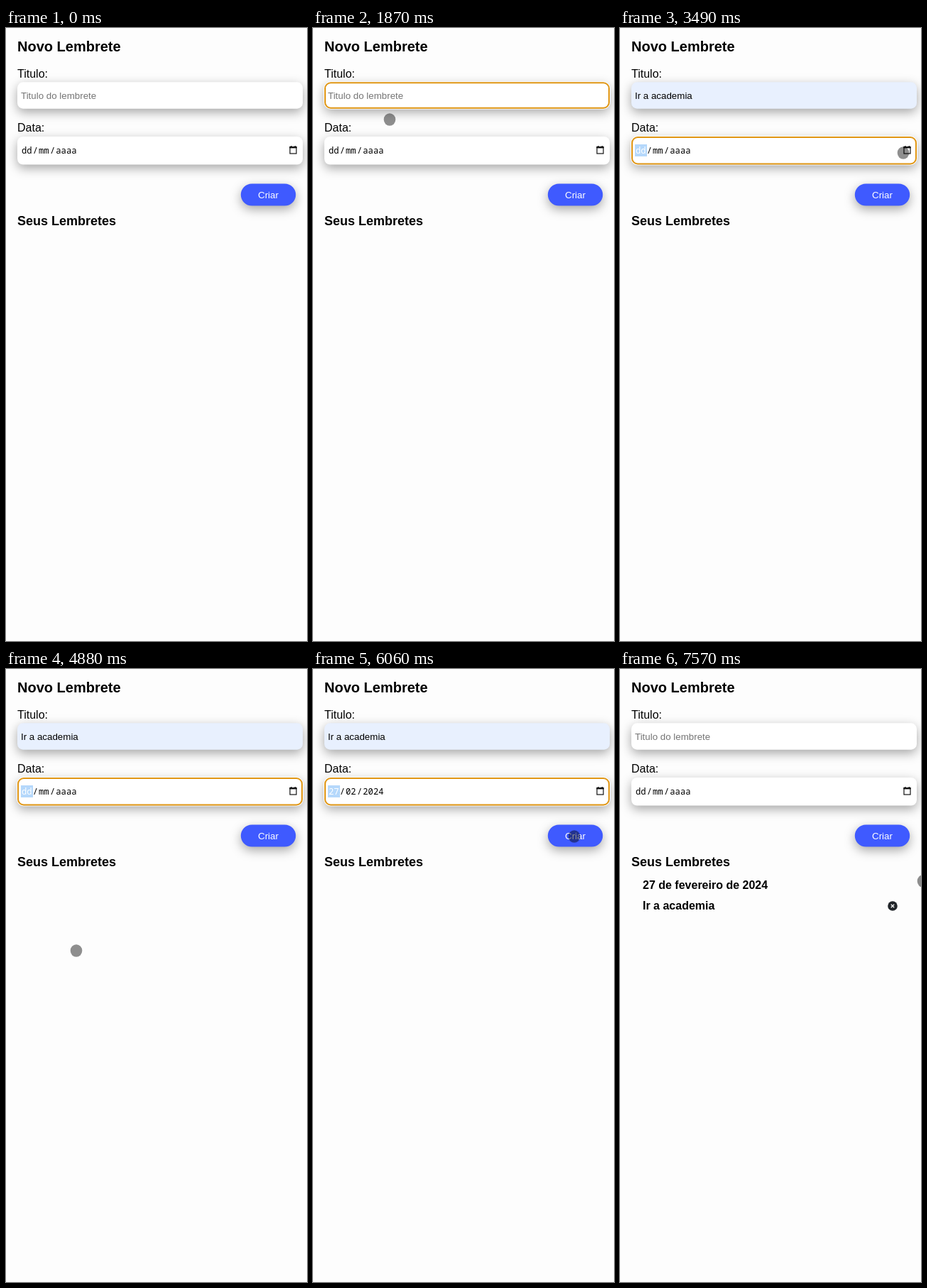
These frames come from a looping animation (424 by 864 pixels, 8 s). An HTML page with a canvas:

```html
<!DOCTYPE html>
<html lang="pt">
<head>
<meta charset="utf-8">
<title>Lembretes</title>
<style>
  html, body { margin: 0; width: 100%; height: 100%; overflow: hidden; background: #fdfdfd; }
  canvas { display: block; width: 424px; height: 864px; }
</style>
</head>
<body>
<canvas id="stage" width="424" height="864"></canvas>
<script>
const ctx = document.getElementById('stage').getContext('2d');
const LOOP = 8000;
const STEP = 100; // the pointer is redrawn ten times a second
const SANS = '"Liberation Sans", Arial, sans-serif';
const MONO = '"Noto Sans Mono", "DejaVu Sans Mono", monospace';

// Moments when the state of the form changes
const AT = { focusTitle: 1380, fill: 2270, focusDate: 3490, pickDate: 4980, create: 6160 };

// Pointer script: jump to a place, glide from there, hide over native popups
const jump = (at, x, y) => ({ at, until: at, x, y });
const glide = (at, until, x, y) => ({ at, until, x, y });
const hide = at => ({ at, hidden: true });
const moves = [
  hide(0),
  jump(590, 4, 146), glide(590, 1090, 107, 104), glide(1670, 2070, 109, 154), hide(2070),
  jump(2770, 128, 142), glide(2770, 3270, 399, 176), glide(3670, 4080, 292, 230), hide(4080),
  jump(4880, 99, 397), glide(4880, 5570, 315, 279), glide(5760, 6060, 368, 236),
  glide(6160, 6560, 338, 313), glide(6660, 6960, 336, 395), glide(7270, 7570, 427, 299)
];

function pointerAt(t) {
  const i = moves.findLastIndex(m => m.at <= t);
  const to = moves[i], from = moves[i - 1];
  if (to.hidden) return null;
  if (to.until === to.at) return to;
  const span = to.until - to.at;
  const u = Math.min(1, Math.floor((t - to.at) / STEP) * STEP / (span - span % STEP));
  const ease = u * u * (3 - 2 * u);
  return { x: from.x + (to.x - from.x) * ease, y: from.y + (to.y - from.y) * ease };
}

function text(str, x, y, font, color = '#000') {
  ctx.font = font;
  ctx.fillStyle = color;
  ctx.fillText(str, x, y);
}

function rounded(x, y, w, h, r) {
  ctx.beginPath();
  ctx.roundRect(x, y, w, h, r);
}

function panel(x, y, w, h, r, fill) {
  ctx.save();
  ctx.shadowColor = 'rgba(0,0,0,.35)';
  ctx.shadowBlur = 15;
  ctx.shadowOffsetY = 5;
  ctx.fillStyle = fill;
  rounded(x, y, w, h, r);
  ctx.fill();
  ctx.restore();
}

function outline(x, y, w, h, inset, width, color) {
  ctx.lineWidth = width;
  ctx.strokeStyle = color;
  rounded(x + inset, y + inset, w - 2 * inset, h - 2 * inset, 9 - inset);
  ctx.stroke();
}

function field(y, h, fill, focused) {
  const box = [16, y, 402, h];
  panel(...box, 8, fill);
  if (!focused) return;
  outline(...box, -0.5, 1, '#fff');
  outline(...box, 1, 2, '#e09614');
}

function calendarIcon() {
  ctx.strokeStyle = ctx.fillStyle = '#111';
  ctx.lineWidth = 1.2;
  ctx.strokeRect(400, 167.6, 9, 9.4);
  ctx.fillRect(399.5, 167, 10, 2.4);
  for (const x of [401, 406.6]) ctx.fillRect(x, 166, 1.4, 2);
}

function dateField(focused, picked) {
  const [day, month, year] = picked ? ['27', '02', '2024'] : ['dd', 'mm', 'aaaa'];
  const font = '12.2px ' + MONO;
  field(153, 39.5, '#fff', focused);
  if (focused) {
    ctx.fillStyle = '#b5d8fb';
    ctx.fillRect(21, 164, 17, 17);
  }
  text(day, 22, 177, font, focused ? '#fff' : '#000');
  text('/', 37.8, 177, font);
  text(month, 46, 177, font);
  text('/', 62, 177, font);
  text(year, 70.3, 177, font);
  calendarIcon();
}

function reminder() {
  text('27 de fevereiro de 2024', 32, 310, 'bold 16px ' + SANS);
  text('Ir a academia', 32, 339, 'bold 16px ' + SANS);
  ctx.fillStyle = '#212529';
  ctx.beginPath();
  ctx.arc(384, 334, 6.8, 0, Math.PI * 2);
  ctx.fill();
  ctx.strokeStyle = '#fff';
  ctx.lineWidth = 1.3;
  ctx.beginPath();
  for (const d of [-2.2, 2.2]) {
    ctx.moveTo(384 - d, 331.8);
    ctx.lineTo(384 + d, 336.2);
  }
  ctx.stroke();
}

function draw(t) {
  const created = t >= AT.create;
  const filled = t >= AT.fill && !created;
  const onTitle = t >= AT.focusTitle && t < AT.focusDate;
  const onDate = t >= AT.focusDate && !created;

  ctx.fillStyle = '#fdfdfd';
  ctx.fillRect(0, 0, 424, 864);

  text('Novo Lembrete', 16, 33, 'bold 20px ' + SANS);
  field(76.3, 37.4, filled ? '#e8f0fe' : '#fff', onTitle);
  text(filled ? 'Ir a academia' : 'Titulo do lembrete', 21, 100,
    '13.333px ' + SANS, filled ? '#000' : '#757575');
  text('Titulo:', 16, 70, '16px ' + SANS);

  dateField(onDate, t >= AT.pickDate && !created);
  text('Data:', 16, 146, '16px ' + SANS);

  panel(330.8, 219.5, 77.4, 31, 15.5, '#3f5aff');
  text('Criar', 355, 240, '13.333px ' + SANS, '#fff');
  text('Seus Lembretes', 16, 278, 'bold 18px ' + SANS);
  if (created) reminder();

  const pos = pointerAt(t);
  if (pos) {
    ctx.fillStyle = 'rgba(0,0,0,.44)';
    ctx.beginPath();
    ctx.ellipse(pos.x, pos.y, 8.3, 8.8, 0, 0, Math.PI * 2);
    ctx.fill();
  }
}

const start = performance.now();
function tick() {
  draw((performance.now() - start) % LOOP);
  requestAnimationFrame(tick);
}
tick();
</script>
</body>
</html>
```
